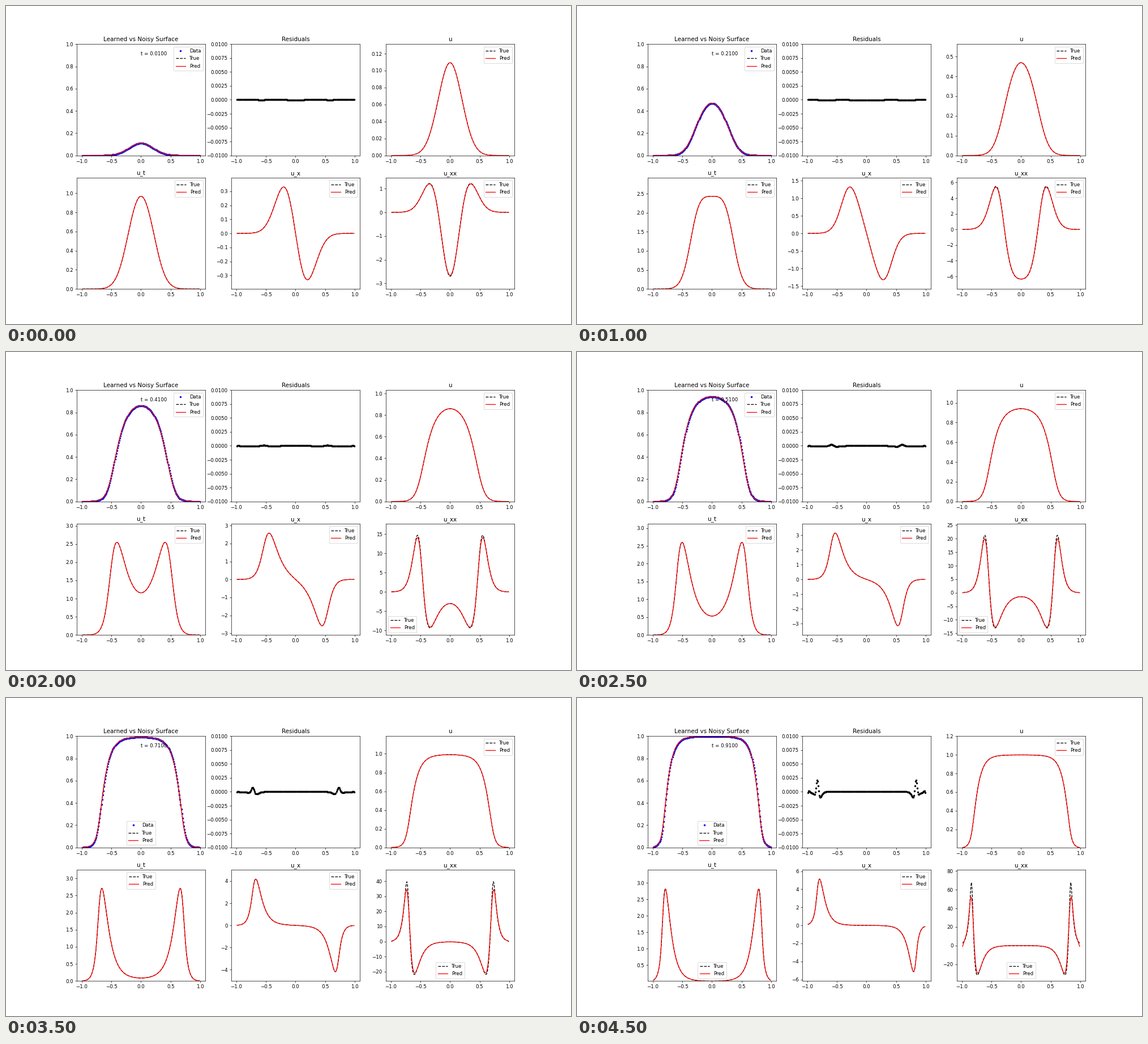
Write a matplotlib script that moves like this. It is 998 px wide and 561 px high and loops after 5000 ms.

```python
import numpy as np
import matplotlib.pyplot as plt
from matplotlib.animation import FuncAnimation

W, H, DPI = 998, 561, 62.375
FRAMES, INTERVAL = 10, 500
D, R = 0.02, 10.0              # diffusion and growth rate
TIMES = 0.01 + 0.1 * np.arange(FRAMES)
STEP, DT = 0.0025, 0.0001      # fine grid of the solver
HALF, DEGREE = 5, 3            # window of the local polynomial fit

grid = np.arange(-600, 601) * STEP
x = np.arange(-99, 100) / 100
pick = np.rint((x - grid[0]) / STEP).astype(int)


def laplacian(u):
    out = np.zeros_like(u)
    out[1:-1] = (u[2:] - 2 * u[1:-1] + u[:-2]) / STEP**2
    return out


def rate(u):
    """Logistic growth with diffusion proportional to density."""
    return D / 2 * laplacian(u * u) + R * u * (1 - u)


def solve():
    """Growth of a small Gaussian: u, u_t, u_x, u_xx per time."""
    u = 0.1 * np.exp(-grid**2 / (2 * 0.2**2))
    states, done = [], 0
    for t in TIMES:
        target = int(round(t / DT))
        for _ in range(target - done):
            u = u + DT * rate(u + DT / 2 * rate(u))
        done = target
        fields = u, rate(u), np.gradient(u, STEP), laplacian(u)
        states.append([f[pick] for f in fields])
    return states


def local_fit(v):
    """Value, slope and curvature of a sliding polynomial fit."""
    n = len(x)
    out = np.empty((3, n))
    for i in range(n):
        start = min(max(i - HALF, 0), n - 2 * HALF - 1)
        win = slice(start, start + 2 * HALF + 1)
        c = np.polyfit(x[win] - x[i], v[win], DEGREE)
        out[:, i] = c[-1], c[-2], 2 * c[-3]
    return out


def predict(state):
    u, ux, uxx = local_fit(state[0])
    return [u, local_fit(state[1])[0], ux, uxx]


true = solve()
pred = [predict(s) for s in true]

fig, axes = plt.subplots(2, 3, figsize=((W + 0.001) / DPI, (H + 0.001) / DPI),
                         dpi=DPI)
surface, resid, *panels = axes.flat


def add_pair(ax):
    return (ax.plot(x, x, 'k--', label='True')[0],
            ax.plot(x, x, 'r-', label='Pred')[0])


surface.set_title('Learned vs Noisy Surface')
data, = surface.plot(x, x, 'b.', label='Data')
top_pair = add_pair(surface)
clock = surface.text(0, 0.9, '')
surface.set_ylim(0, 1)
surface.legend(loc='best')

resid.set_title('Residuals')
errors, = resid.plot(x, 0 * x, 'k.')
resid.set_ylim(-0.01, 0.01)

pairs = []
for ax, name in zip(panels, ('u', 'u_t', 'u_x', 'u_xx')):
    ax.set_title(name)
    pairs.append(add_pair(ax))
    ax.legend(loc='best')


def limits(v):
    """Padded range; an edge within half a pixel of a tick moves onto it."""
    lo, hi = 1.2 * v.min(), 1.2 * v.max()
    half = 0.5 * (hi - lo) / 196
    if 0 < lo < half:
        lo = 0
    if 0 < round(hi, 1) - hi < half:
        hi = round(hi, 1)
    return lo, hi


def update(i):
    u, fit = true[i][0], pred[i][0]
    data.set_ydata(u)
    top_pair[0].set_ydata(u)
    top_pair[1].set_ydata(fit)
    errors.set_ydata(fit - u)
    clock.set_text(f't = {TIMES[i]:.4f}')
    for ax, pair, a, b in zip(panels, pairs, true[i], pred[i]):
        pair[0].set_ydata(a)
        pair[1].set_ydata(b)
        ax.set_ylim(*limits(a))
    return []


anim = FuncAnimation(fig, update, frames=FRAMES, interval=INTERVAL,
                     repeat=True, repeat_delay=0, blit=False)
plt.show()
```
